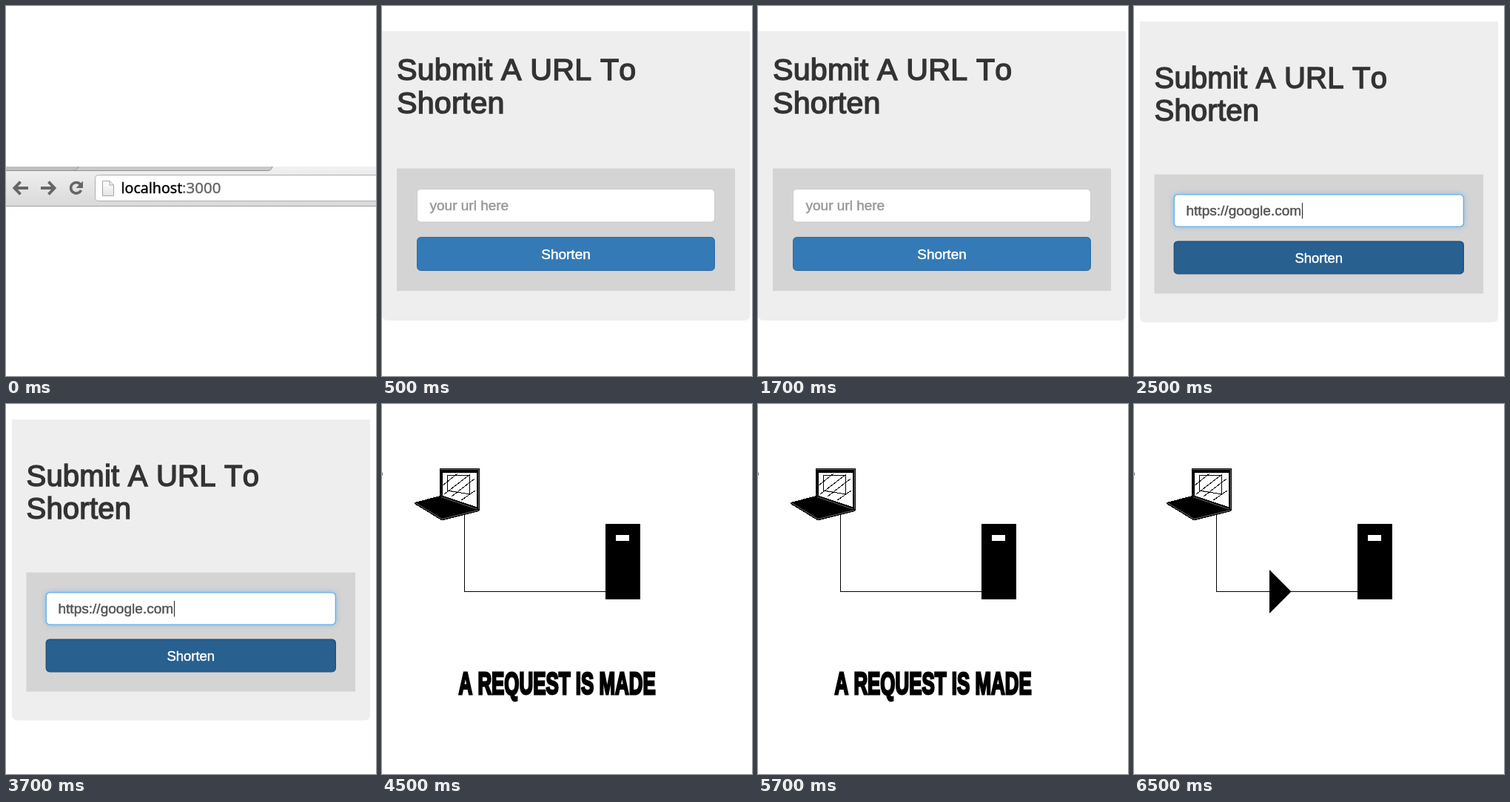
An HTML page that plays this animation: 500 px wide and 500 px high, repeating every 8000 ms.

```html
<!DOCTYPE html>
<html lang="en">
<head>
<meta charset="utf-8">
<title>URL shortener</title>
<style>
html, body { margin: 0; height: 100%; overflow: hidden; background: #fff; }
svg { display: block; width: 100vw; height: 100vh; font-family: "Liberation Sans", Arial, sans-serif; font-kerning: none; }
svg > g, .typed, .caption, .arrow { display: none; }
.bar #bar, .empty #form, .filled #form, .request #net, .travel #net,
.filled .typed, .request .caption, .travel .arrow { display: inline; }
.filled .blank { display: none; }
.filled #form { transform: translate(8px, 14px) scale(.973); }
.btn { fill: #337ab7; stroke: #2e6da4; }
.filled .btn { fill: #286090; stroke: #204d74; stroke-width: 1.3; }
.field { fill: #fff; stroke: #ccc; }
.filled .field { stroke: #66afe9; stroke-width: 1.4; filter: drop-shadow(0 0 4px #66afe9aa); }
.title { font-size: 41.2px; letter-spacing: .2px; fill: #333; stroke: #333; stroke-width: 1.5; }
.label { font-size: 19px; stroke-width: .5; }
.url { font-family: "Noto Sans", "Open Sans", sans-serif; }
.caption { font-weight: bold; font-size: 42px; stroke: #000; stroke-width: 2.4; vector-effect: non-scaling-stroke; }
</style>
</head>
<body>
<svg id="stage" class="bar" viewBox="0 0 500 500">
  <defs>
    <linearGradient id="tool" x2="0" y2="1">
      <stop stop-color="#f1f1f1"/><stop offset="1" stop-color="#d9d9d9"/>
    </linearGradient>
    <linearGradient id="paper" x2="0" y2="1">
      <stop stop-color="#fff"/><stop offset="1" stop-color="#e4e4e4"/>
    </linearGradient>
  </defs>

  <g id="bar">
    <rect y="217" width="500" height="54" fill="url(#tool)"/>
    <path d="M0 217H360Q359 222 354 222H0Z" fill="#c9c9c9"/>
    <path d="M0 217H98Q96 222 91 222H0Z" fill="#bfbfbf"/>
    <path d="M0 222.5H91Q96 222 98 217M91 222.5H354Q359 222 360 217" fill="none" stroke="#8f8f8f"/>
    <path d="M0 270.5H500" stroke="#a0a0a0"/>
    <rect x="120.5" y="228.5" width="400" height="35" rx="4" fill="#fff" stroke="#adadad"/>
    <g fill="none" stroke="#666" stroke-width="4">
      <path d="M30 246H12M19.5 237.5L11.5 246L19.5 254.5"/>
      <path d="M47 246H65M57.5 237.5L65.5 246L57.5 254.5"/>
      <path d="M100.5 241A7.3 7.3 0 1 0 101.5 249" stroke-width="3.6"/>
    </g>
    <path d="M104 236.5V246H94.5Z" fill="#666"/>
    <path d="M130.5 236.5H140L145.5 242V256.5H130.5Z" fill="url(#paper)" stroke="#a3a3a3"/>
    <path d="M140 236.5V242H145.5" fill="none" stroke="#a3a3a3"/>
    <g class="url" stroke-width=".4">
      <text x="155.5" y="253" font-size="19.6" stroke="#000">localhost</text>
      <text x="238" y="253" font-size="20.5" fill="#666" stroke="#666">:3000</text>
    </g>
  </g>

  <g id="form">
    <path class="blank" d="M0 34H497.5V417Q497.5 425 489.5 425H8Q0 425 0 417Z" fill="#eee"/>
    <path class="typed" d="M0 7.2H497.5V417Q497.5 425 489.5 425H8Q0 425 0 417Z" fill="#eee"/>
    <g class="title">
      <text x="20" y="100">Submit A URL To</text>
      <text x="20" y="145">Shorten</text>
    </g>
    <rect x="20" y="219.5" width="457" height="165.5" fill="#d4d4d4"/>
    <rect class="field" x="47.5" y="247.5" width="402" height="44.5" rx="5"/>
    <rect class="btn" x="47.5" y="312.5" width="402" height="45" rx="5"/>
    <g class="label">
      <text class="blank" x="64.5" y="276" fill="#999" stroke="#999">your url here</text>
      <g class="typed">
        <text x="64.2" y="276.3" font-size="19.6" fill="#555" stroke="#555">https://google.com</text>
        <path d="M225.6 259V281" stroke="#333" stroke-width="1.2"/>
      </g>
      <text x="248.5" y="342" text-anchor="middle" fill="#fff" stroke="#fff">Shorten</text>
    </g>
  </g>

  <g id="net">
    <path d="M0 93.5H1M0 95.5H1" stroke="#000"/>
    <path d="M111.5 148V253.5H303" fill="none" stroke="#000" shape-rendering="crispEdges"/>
    <g shape-rendering="crispEdges">
      <path d="M78 87H132V144L78 125Z"/>
      <path d="M82 93H128V139L82 124Z" fill="#fff"/>
      <path d="M88.5 97L118.5 96V122L88.5 117ZM82 110L102 94M84 122L119 95M94 125L125 101M107 130L126 117" fill="none" stroke="#000"/>
      <path d="M44 133L79 124L131 143V145L81 157.5L44 135Z"/>
    </g>
    <path d="M79 88.5H130.5V142M46 134L81 155.5L130 143.5M80 125.5L128 142" fill="none" stroke="#999" stroke-width=".7"/>
    <path d="M302 162H349V264H302Z"/>
    <path d="M316 177H334V185H316Z" fill="#fff"/>
    <path class="arrow" d="M183 224L212.5 253.5L183 283Z"/>
    <text class="caption" transform="translate(103.5 392) scale(.617 1)">A REQUEST IS MADE</text>
  </g>
</svg>
<script>
const stage = document.getElementById('stage');
const scenes = [[6500, 'travel'], [4500, 'request'], [2500, 'filled'], [500, 'empty'], [0, 'bar']];
const start = performance.now();

function draw() {
  const t = (performance.now() - start) % 8000;
  stage.setAttribute('class', scenes.find(([from]) => t >= from)[1]);
  requestAnimationFrame(draw);
}
draw();
</script>
</body>
</html>
```
